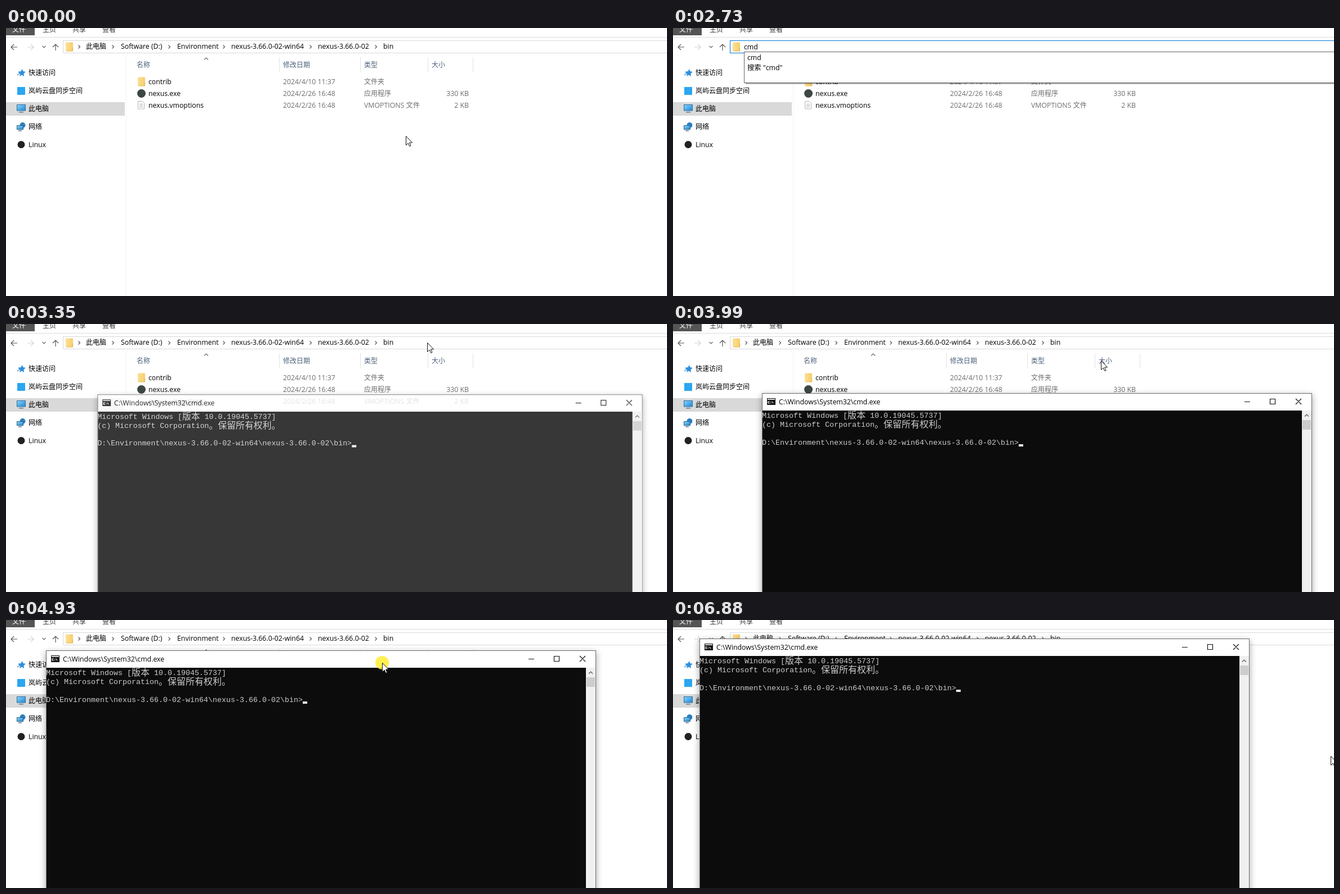
Recreate the animation shown at these times as an HTML page. Size 1174x477 px, loop 7.01 s.

```html
<!DOCTYPE html>
<html lang="zh-CN">
<head>
<meta charset="utf-8">
<title>在文件夹中打开命令行</title>
<style>
  html, body { margin: 0; width: 100%; height: 100%; overflow: hidden; background: #fff; }
  svg { display: block; width: 1174px; height: 477px; }
  text { font: 12.3px "Open Sans", "Noto Sans CJK SC", "Noto Sans CJK", sans-serif; white-space: pre; }
  .zh { font-size: 12px; }
  .con { font: 13.33px "Liberation Mono", "Noto Sans Mono", monospace; fill: #ccc; }
  .conzh { font: 300 16px "Noto Sans CJK SC", "Noto Sans CJK", sans-serif; fill: #ccc; }
  .head { fill: #4c607a; }
  .dim { fill: #6d6d6d; }
  .line { fill: none; stroke-width: 1.2; }
</style>
</head>
<body>
<svg id="stage" viewBox="0 0 1174 477">
  <defs>
    <linearGradient id="gold" x2="1"><stop stop-color="#fbe095"/><stop offset="1" stop-color="#f5cd6b"/></linearGradient>
    <linearGradient id="sky" x2="1" y2="1"><stop stop-color="#8bd3f8"/><stop offset="1" stop-color="#1e88d4"/></linearGradient>
    <filter id="soft" x="-5%" y="-5%" width="110%" height="110%"><feGaussianBlur stdDeviation="6"/></filter>
  </defs>
</svg>
<script>
const LOOP = 7010;
const stage = document.getElementById('stage');

function add(parent, tag, attrs, content) {
  const node = document.createElementNS('http://www.w3.org/2000/svg', tag);
  for (const key in attrs) node.setAttribute(key, attrs[key]);
  if (content !== undefined) node.textContent = content;
  return parent.appendChild(node);
}
const group = (parent, attrs) => add(parent, 'g', attrs);
const label = (parent, x, y, content, attrs) => add(parent, 'text', { x, y, ...attrs }, content);
const rect = (parent, x, y, width, height, fill, attrs) =>
  add(parent, 'rect', { x, y, width, height, fill, ...attrs });
const stroke = (parent, d, color, attrs) =>
  add(parent, 'path', { d, class: 'line', stroke: color, ...attrs });
const zh = { class: 'zh' };

function folder(parent, x, y) {
  rect(parent, x, y, 13, 15.5, 'url(#gold)', { rx: 1 });
  stroke(parent, `M${x + 12.5} ${y + 9}v6.5h-11`, '#e3b650', { 'stroke-width': 1 });
}

// Ribbon
rect(stage, 0, 0, 1174, 477, '#fff');
rect(stage, 0, 0, 51, 13, '#555');
label(stage, 11, 7, '文件', { class: 'zh', fill: '#fff' });
['主页', '共享', '查看'].forEach((name, i) => label(stage, 65 + 53 * i, 7, name, { class: 'zh', fill: '#333' }));
rect(stage, 0, 16, 1174, 1, '#dadbdc');

// Navigation buttons
const backArrow = 'M20 34H9M14 29L9 34L14 39';
stroke(stage, backArrow, '#555', { 'stroke-width': 1.6 });
stroke(stage, backArrow, '#d4d4d4', { 'stroke-width': 1.6, transform: 'translate(58 0) scale(-1 1)' });
stroke(stage, 'M64.5 32L67.5 35L70.5 32', '#666');
stroke(stage, 'M88 40V29M83 34L88 29L93 34', '#555', { 'stroke-width': 1.8 });

// Side pane
rect(stage, 213, 47, 1, 430, '#f3f3f3');
rect(stage, 0, 132, 211, 24, '#d9d9d9');
['快速访问', '岚屿云盘同步空间', '此电脑', '网络', 'Linux'].forEach((name, i) =>
  label(stage, 40, 83.8 + 32 * i, name, i < 4 ? zh : {}));
add(stage, 'path', { d: 'M29 73L30.5 77L35 78L31.500 81L32 86L28 83.500L24 86L25 81.500L21 78L26.500 77Z', fill: '#2f8fdc' });
stroke(stage, 'M20 84L25 80', '#2f8fdc');
rect(stage, 20, 105, 14, 14, '#2aa7f0');
rect(stage, 19.500, 136.500, 15, 10.500, 'url(#sky)', { stroke: '#2b6ea3' });
rect(stage, 23, 149, 8, 1.500, '#5c7f99');
add(stage, 'circle', { cx: 29.500, cy: 173, r: 5, fill: '#2c7fc4' });
rect(stage, 19.500, 173.500, 11, 7, 'url(#sky)', { stroke: '#35607f' });
rect(stage, 22, 182, 6, 1.500, '#4a6f8c');
add(stage, 'circle', { cx: 27, cy: 207.500, r: 6.500, fill: '#222' });
const expanders = group(stage);
for (let i = 0; i < 5; i++) stroke(expanders, `M4 ${76.500 + 32 * i}l3 3l-3 3`, '#a6a6a6', { 'stroke-width': 1 });

// File list
[['名称', 232], ['修改日期', 492], ['类型', 636], ['大小', 756]].forEach(([name, x]) =>
  label(stage, x, 70, name, { class: 'zh head' }));
[485, 629, 749, 829].forEach(x => rect(stage, x, 52, 1, 27, '#e3e3e3'));
stroke(stage, 'M352 56.500L355.500 53L359 56.500', '#666', { 'stroke-width': 1 });
const rowGlow = rect(stage, 229, 85, 597, 21, '#e5f3ff');
[['contrib', '2024/4/10 11:37', '文件夹', ''],
 ['nexus.exe', '2024/2/26 16:48', '应用程序', '330 KB'],
 ['nexus.vmoptions', '2024/2/26 16:48', 'VMOPTIONS 文件', '2 KB']].forEach(([name, date, type, size], i) => {
  const y = 100 + 21 * i;
  label(stage, 253, y, name);
  label(stage, 492, y, date, { class: 'dim' });
  label(stage, 636, y, type, { class: i < 2 ? 'zh dim' : 'dim' });
  label(stage, 822, y, size, { class: 'dim', 'text-anchor': 'end' });
});
folder(stage, 234, 87.500);
add(stage, 'circle', { cx: 240.500, cy: 116.500, r: 7.500, fill: '#3d4743' });
add(stage, 'path', { d: 'M234.500 130.500h8l3 3v10.500h-11z', fill: '#fff', stroke: '#b5b5b5' });
stroke(stage, 'M237 135.500h6M237 138h6M237 140.500h6', '#b5b5b5', { 'stroke-width': 1 });

// Address bar
const bar = rect(stage, 101.500, 22.500, 1080, 22, '#fff', { stroke: '#d9d9d9' });
folder(stage, 106, 25.500);
const crumbs = group(stage);
[['此电脑', 142], ['Software (D:)', 204], ['Environment', 304], ['nexus-3.66.0-02-win64', 400],
 ['nexus-3.66.0-02', 554], ['bin', 670]].forEach(([name, x], i) => label(crumbs, x, 37.300, name, i ? {} : zh));
[130, 190, 290, 387, 541, 657].forEach(x => stroke(crumbs, `M${x - 1.500} 30.500l3 3l-3 3`, '#555'));
const selection = rect(stage, 126, 25, 342, 17, '#0078d7');
const entry = label(stage, 126, 38, '');
const caret = rect(stage, 151, 25, 1, 17, '#000');

const menu = group(stage);
rect(menu, 129, 45, 1060, 55, '#000', { opacity: .3 });
rect(menu, 126.500, 42.500, 1060, 55, '#fff', { stroke: '#646464' });
const menuItem = label(menu, 132, 56.500, '');
const menuSearch = label(menu, 132, 75, '');

// Console window, drawn from its own top left corner
const win = group(stage);
rect(win, -1, 3, 979, 512, '#000', { opacity: .3, filter: 'url(#soft)' });
rect(win, .5, .5, 976, 511, '#fff', { stroke: '#6b6b6b' });
rect(win, 9, 9, 15, 12, '#111');
rect(win, 10, 10, 13, 2, '#ddd');
stroke(win, 'M14 15h-3v3h3M16 15v1M16 17v1M18 15l2 3', '#fff', { 'stroke-width': 1 });
label(win, 30, 20, 'C:\\Windows\\System32\\cmd.exe');
stroke(win, 'M857 15.500h10M902.500 10.500h9v9h-9zM948 10l10 10M958 10l-10 10', '#111', { 'stroke-width': 1.1 });
rect(win, 1, 31, 958, 480, '#0c0c0c');
rect(win, 959, 31, 17, 480, '#f0f0f0');
rect(win, 960, 48, 15, 17, '#cdcdcd');
stroke(win, 'M964 41.500l3.500-3.500l3.500 3.500', '#505050', { 'stroke-width': 1.6 });
const con = { class: 'con' }, conzh = { class: 'conzh' };
label(win, 0, 44, 'Microsoft Windows [', con);
label(win, 152, 45, '版本', conzh);
label(win, 184, 44, ' 10.0.19045.5737]', con);
label(win, 0, 60, '(c) Microsoft Corporation', con);
label(win, 200, 61, '。保留所有权利。', conzh);
const path = 'D:\\Environment\\nexus-3.66.0-02-win64\\nexus-3.66.0-02\\bin';
label(win, 0, 92, path + '>', con);
const cursor = rect(win, 456, 91, 8, 4, '#f2f2f2');

// Pointer
const click = add(stage, 'circle', { r: 12, fill: '#ffee32', opacity: .85 });
const arrow = add(stage, 'path', {
  d: 'M.5 .5V16.500L4.200 13L6.700 18.500L9 17.500L6.600 12H11.500Z', fill: '#fff', stroke: '#111'
});
const beam = stroke(stage, 'M747 25.500h2l1 1l1-1h2M750 26.500v14M747 41.500h2l1-1l1 1h2', '#222');

// Each step: start time, then values held until the next step
const pointerSteps = [
  [0, 710, 192], [120, 716, 166], [190, 729, 130], [260, 740, 92], [330, 746, 54], [400, 748, 33],
  [3990, 760, 65], [4050, 761, 94], [4120, 757, 132], [4190, 755, 164], [4390, 755, 154], [4450, 755, 145],
  [5330, 668, 64], [5400, 790, 104], [5460, 935, 163], [5530, 1080, 215], [5600, 1168, 242]
];
const dragSteps = [
  [0, 0, 0], [4660, -6, -5], [4720, -22, -17], [4790, -45, -34], [4860, -68, -53], [4930, -87, -69],
  [5000, -98, -78], [5060, -105, -84], [5130, -109, -88], [5200, -111, -90]
];
const openSteps = [[0, 0, 1], [3230, .2, .945], [3290, .55, .975], [3350, .82, .991], [3410, .95, .998], [3480, 1, 1]];
const entrySteps = [[0, ''], [660, path], [1980, 'c'], [2050, 'cm'], [2110, 'cmd'], [2990, '']];
const expanderSteps = [[0, 0], [660, .3], [730, .7], [860, .55], [990, .35], [1520, 0]];
const cursorSteps = [[0, 1], [4120, 0], [4660, 1], [5200, 0], [5800, 1], [6330, 0], [6880, 1]];

const at = (steps, t) => steps.findLast(step => step[0] <= t).slice(1);
const within = (t, from, to) => t >= from && t < to;
const show = (node, on) => { node.style.display = on ? '' : 'none'; };

function render(t) {
  const editing = within(t, 660, 2990);
  const typing = within(t, 1980, 2990);
  const dragging = within(t, 4590, 5330);
  const [text] = at(entrySteps, t);
  const [dx, dy] = at(dragSteps, t);
  let [x, y] = at(pointerSteps, t);
  if (dragging) { x += dx; y += dy; }

  bar.setAttribute('stroke', editing ? '#0078d7' : '#d9d9d9');
  show(crumbs, !editing);
  show(selection, editing && !typing);
  selection.setAttribute('width', t < 1520 ? 342 : 341);
  entry.textContent = text;
  entry.setAttribute('fill', typing ? '#000' : '#fff');
  show(caret, within(t, 2180, 2730));
  show(menu, within(t, 2050, 2990));
  menuItem.textContent = text;
  menuSearch.textContent = `搜索 "${text}"`;
  expanders.setAttribute('opacity', at(expanderSteps, t)[0]);

  const row = Math.floor((y - 85) / 21);
  show(rowGlow, row >= 0 && row < (t < 3000 ? 3 : 1));
  rowGlow.setAttribute('y', 85 + 21 * row);

  const [alpha, scale] = at(openSteps, t);
  show(win, alpha > 0);
  win.setAttribute('opacity', alpha);
  win.setAttribute('transform',
    `translate(${158 + dx + 488.5 * (1 - scale)} ${123 + dy + 256 * (1 - scale)}) scale(${scale})`);
  show(cursor, at(cursorSteps, t)[0]);

  const place = `translate(${x} ${y})`;
  arrow.setAttribute('transform', place);
  click.setAttribute('transform', place);
  show(click, dragging || within(t, 590, 730));
  show(arrow, !within(t, 730, 2990));
  show(beam, within(t, 730, 1980));
}

const start = performance.now();
function tick(now) {
  render(Math.max(0, now - start) % LOOP);
  requestAnimationFrame(tick);
}
render(0);
requestAnimationFrame(tick);
</script>
</body>
</html>
```
